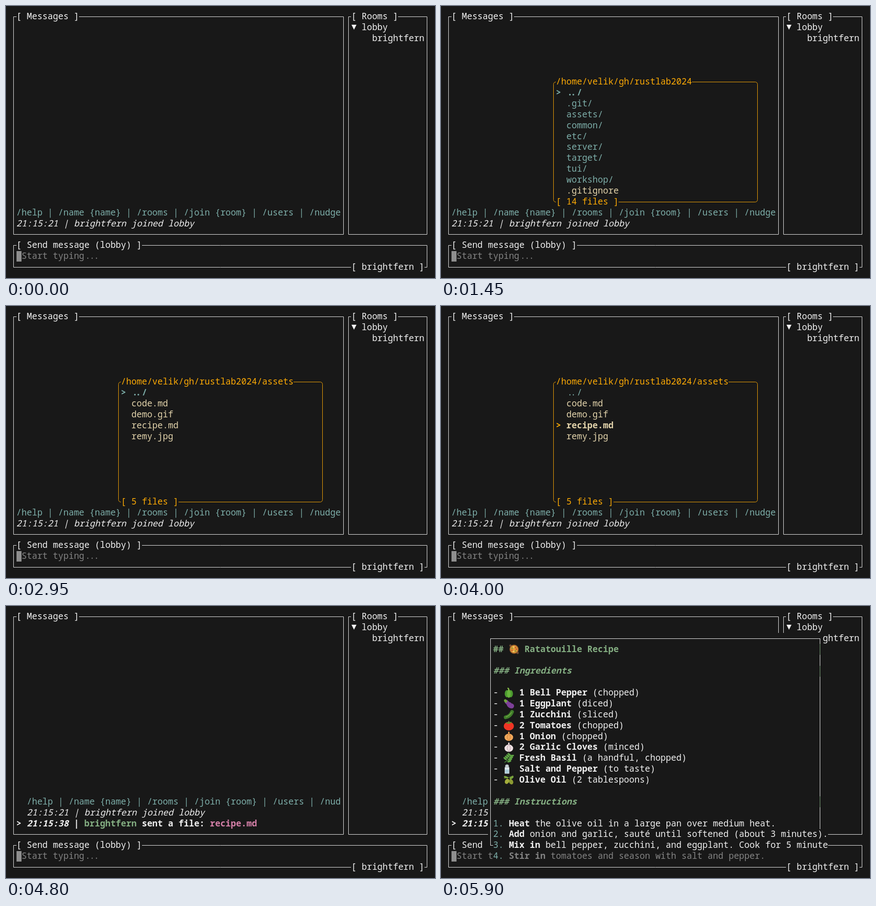
Write an HTML page with a canvas that moves like this. It is 940 by 596 pixels and loops after 9100 ms.

```html
<!DOCTYPE html>
<html lang="en">
<head>
<meta charset="utf-8">
<title>Terminal chat</title>
<style>
html, body { margin: 0; width: 100%; height: 100%; overflow: hidden; background: #181818; }
canvas { display: block; }
</style>
</head>
<body>
<canvas id="stage" width="940" height="596"></canvas>
<script>
const ctx = document.getElementById('stage').getContext('2d');
const LOOP = 9100, CW = 11.465, CH = 23.87;
const BG = '#181818', FG = '#f0f0f0', TEAL = '#7daea9', ORANGE = '#fba905', SAND = '#e2d3ab',
  GREEN = '#84ae82', PINK = '#d680a9', GRAY = '#838383';
const USER = 'brightfern';

// Terminal grid: cell edges and border line positions
const X = c => 11.05 + c * CW;
const Y = r => 11.5 + r * CH;
const lineX = c => Math.floor(X(c) + CW / 2);
const lineY = r => Math.floor(Y(r) + 11.9);

function rect(x0, y0, x1, y1, color) {
  ctx.fillStyle = color;
  ctx.fillRect(x0, y0, x1 - x0, y1 - y0);
}

// Clears whole cells, c1 and r1 excluded
function clear(c0, r0, c1, r1) {
  rect(Math.round(X(c0)), Math.round(Y(r0)), Math.round(X(c1)), Math.round(Y(r1)), BG);
}

// Writes one glyph per cell and returns the next column
function put(col, row, text, color = FG, style = '') {
  ctx.font = `${style} 19.1px "Noto Sans Mono", "DejaVu Sans Mono", monospace`;
  ctx.fillStyle = color;
  [...text].forEach((ch, i) => {
    let pull = 0; // neighbouring dots move together
    if (ch === '.') pull = 2 * ((text[i + 1] === '.') - (text[i - 1] === '.'));
    ctx.fillText(ch, X(col + i) + pull, 29 + row * CH);
  });
  return col + text.length;
}

// Text between asterisks is bold
function rich(col, row, text, color) {
  text.split('*').forEach((part, i) => { col = put(col, row, part, color, i % 2 ? 'bold' : ''); });
}

function box(c0, r0, c1, r1, color = FG, radius = 0) {
  const x = lineX(c0), y = lineY(r0);
  ctx.strokeStyle = color;
  ctx.lineWidth = 1;
  ctx.beginPath();
  ctx.roundRect(x + .5, y + .5, lineX(c1) - x, lineY(r1) - y, radius);
  ctx.stroke();
}

function title(col, row, text, color) {
  clear(col, row, col + text.length, row + 1);
  put(col, row, text, color);
}

function oval(color, x, y, rx, ry = rx, turn = 0) {
  ctx.fillStyle = color;
  ctx.beginPath();
  ctx.ellipse(x, y, rx, ry, turn, 0, 7);
  ctx.fill();
}

function curve(color, width, path) {
  ctx.strokeStyle = color;
  ctx.lineWidth = width;
  ctx.lineCap = 'round';
  ctx.stroke(new Path2D(path));
}

function bulb(skin, vein) {
  curve(skin, 3, 'M0 -3V-9');
  oval(skin, 0, 2, 9.5, 8);
  curve(vein, 1, 'M0 -6Q-7 2 0 9M0 -6Q7 2 0 9');
}

function pan() {
  curve('#6d4c35', 5, 'M-8 -8L8 8');
  oval('#a5622a', 0, 0, 10);
  oval('#e0a03a', 0, 0, 8);
  for (let i = 0; i < 7; i++)
    oval(['#c8452c', '#7d8f35', '#f3cf73'][i % 3], 5 * Math.cos(i * .9), 5 * Math.sin(i * .9), 1.6);
}

const icons = [
  function pepper() {
    oval('#4c9a2f', -4, 2, 5, 8);
    oval('#4c9a2f', 4, 2, 5, 8);
    oval('#68b53c', 0, 2, 4, 9);
    curve('#8bc34a', 2.5, 'M0 -6Q0 -9 -2 -10');
  },
  function eggplant() {
    curve('#7d3f98', 8, 'M-5 -4L1 2');
    curve('#7d3f98', 11, 'M1 2Q3 5 6 5');
    oval('#6fa53a', -7, -6, 4, 3, .8);
  },
  function cucumber() {
    curve('#3f7d2a', 8, 'M-7 6Q3 4 7 -6');
    curve('#86b94e', 1.2, 'M-6 5Q2 2 6 -5');
  },
  function tomato() {
    oval('#ee3524', 0, 1.5, 11, 9.5);
    curve('#4d9a35', 2.2, 'M-5 -6L0 -5L5 -7M0 -5V-9');
  },
  () => bulb('#f0a75a', '#c97b35'),
  () => bulb('#eee0e2', '#b898a4'),
  function herb() {
    curve('#4f8f3c', 1.6, 'M-9 9Q0 4 6 -7');
    for (let i = 0; i < 4; i++) {
      oval('#5fa544', i * 3 - 8, 1 - i * 3, 4.5, 2, .7);
      oval('#5fa544', i * 2 + 1, 7 - i * 4, 4.5, 2, -.3);
    }
  },
  function salt() {
    rect(-9, -4, 1, 10, '#e4eef2');
    rect(-8, 1, 0, 9, '#a9cbd9');
    oval('#c3ccd0', -4, -6, 4, 4);
  },
  function olives() {
    curve('#6b7d35', 1.5, 'M-10 -4Q2 -5 9 -9');
    oval('#78a53d', 6, -5, 5, 2.5, -.6);
    oval('#78a53d', -6, -6, 5, 2, .3);
    oval('#a4ad3b', -4, 3, 4.5, 6, .5);
    oval('#8c9a32', 5, 4, 4.5, 6, -.4);
  }
];

function icon(col, row, draw) {
  ctx.save();
  ctx.translate(X(col + 1), Y(row) + 11.6);
  draw();
  ctx.restore();
}

// Time, folder and selected row of the file picker
const picks = [[950, '/tui', 0], [1450, '', 0], [1850, '', 1], [2000, '', 2], [2950, '/assets', 0],
  [3750, '/assets', 1], [3900, '/assets', 2], [4000, '/assets', 3]];
const folders = {
  '/tui': [3, '../ src/ Cargo.toml'],
  '': [14, '../ .git/ assets/ common/ etc/ server/ target/ tui/ workshop/ .gitignore'],
  '/assets': [5, '../ code.md demo.gif recipe.md remy.jpg']
};

const ingredients = ['*1 Bell Pepper* (chopped)', '*1 Eggplant* (diced)', '*1 Zucchini* (sliced)',
  '*2 Tomatoes* (chopped)', '*1 Onion* (chopped)', '*2 Garlic Cloves* (minced)',
  '*Fresh Basil* (a handful, chopped)', '*Salt and Pepper* (to taste)', '*Olive Oil* (2 tablespoons)'];
const steps = ['*Heat* the olive oil in a large pan over medium heat.',
  '*Add* onion and garlic, sauté until softened (about 3 minutes).',
  '*Mix in* bell pepper, zucchini, and eggplant. Cook for 5 minute',
  '*Stir in* tomatoes and season with salt and pepper.'];

function layout() {
  box(0, 0, 63, 20);
  title(1, 0, '[ Messages ]');
  box(64, 0, 79, 20);
  title(65, 0, '[ Rooms ]');
  ctx.fillStyle = FG;
  ctx.fill(new Path2D('M757 41H768L762.5 52Z'));
  put(67, 1, 'lobby');
  put(69, 2, USER);
  box(0, 21, 79, 23);
  title(1, 21, '[ Send message (lobby) ]');
  title(65, 23, `[ ${USER} ]`);
  rect(23, 537, 34, 560, '#8e8e8e');
  put(2, 22, 'Start typing...', GRAY);
}

function messages(sent, selected) {
  const col = selected ? 3 : 1, row = sent ? 17 : 18, bold = selected ? 'bold' : '';
  const help = '/help | /name {name} | /rooms | /join {room} | /users | /nudge';
  put(col, row, help.slice(0, 63 - col), TEAL);
  put(col, row + 1, `21:15:21 | ${USER} joined lobby`, FG, 'italic');
  if (!sent) return;
  if (selected) put(1, 19, '>', FG, bold);
  let c = put(col, 19, '21:15:38', FG, 'italic ' + bold);
  c = put(c, 19, ' | ', FG, bold);
  c = put(c, 19, USER, GREEN, bold);
  c = put(c, 19, ' sent a file: ', FG, bold);
  put(c, 19, 'recipe.md', PINK, bold);
}

function picker(folder, selected) {
  const [count, names] = folders[folder];
  clear(20, 6, 60, 18);
  box(20, 6, 59, 17, ORANGE, 5);
  title(21, 6, '/home/velik/gh/rustlab2024' + folder, ORANGE);
  title(21, 17, `[ ${count} files ]`, ORANGE);
  names.split(' ').forEach((name, i) => {
    const dir = name.endsWith('/'), bold = i === selected ? 'bold' : '';
    if (bold) put(21, 7 + i, '>', dir ? TEAL : ORANGE, bold);
    put(23, 7 + i, name, dir ? TEAL : SAND, bold);
  });
}

function recipe() {
  clear(8, 2, 72, 20);
  clear(8, 20, 73, 22);
  clear(9, 22, 63, 23);
  const left = lineX(8), top = lineY(2), right = lineX(71), bottom = lineY(21);
  rect(left, top, right + 1, top + 1, FG);
  rect(left, top, left + 1, bottom + 1, FG);
  rect(left, bottom, X(9), bottom + 1, FG);
  rect(right, top, right + 1, Math.round(Y(20)), FG);
  for (const r of [3, 5, 17]) rect(right, Math.round(Y(r)), right + 1, Math.round(Y(r + 1)), GREEN);

  put(9, 3, '##', GREEN, 'bold');
  icon(12, 3, pan);
  put(15, 3, 'Ratatouille Recipe', GREEN, 'bold');
  put(9, 5, '### Ingredients', GREEN, 'italic bold');
  ingredients.forEach((text, i) => {
    put(9, 7 + i, '-');
    icon(11, 7 + i, icons[i]);
    rich(14, 7 + i, text, FG);
  });
  put(9, 17, '### Instructions', GREEN, 'italic bold');
  steps.forEach((text, i) => {
    put(9, 19 + i, `${i + 1}.`, TEAL);
    rich(12, 19 + i, text, i === 3 ? GRAY : FG);
  });
}

function frame(now) {
  const t = now % LOOP;
  rect(0, 0, 940, 596, BG);
  layout();
  messages(t >= 4250, t >= 4800);
  const pick = picks.filter(p => t >= p[0]).pop();
  if (pick && t < 4250) picker(pick[1], pick[2]);
  if (t >= 5850) recipe();
  requestAnimationFrame(frame);
}
requestAnimationFrame(frame);
</script>
</body>
</html>
```
